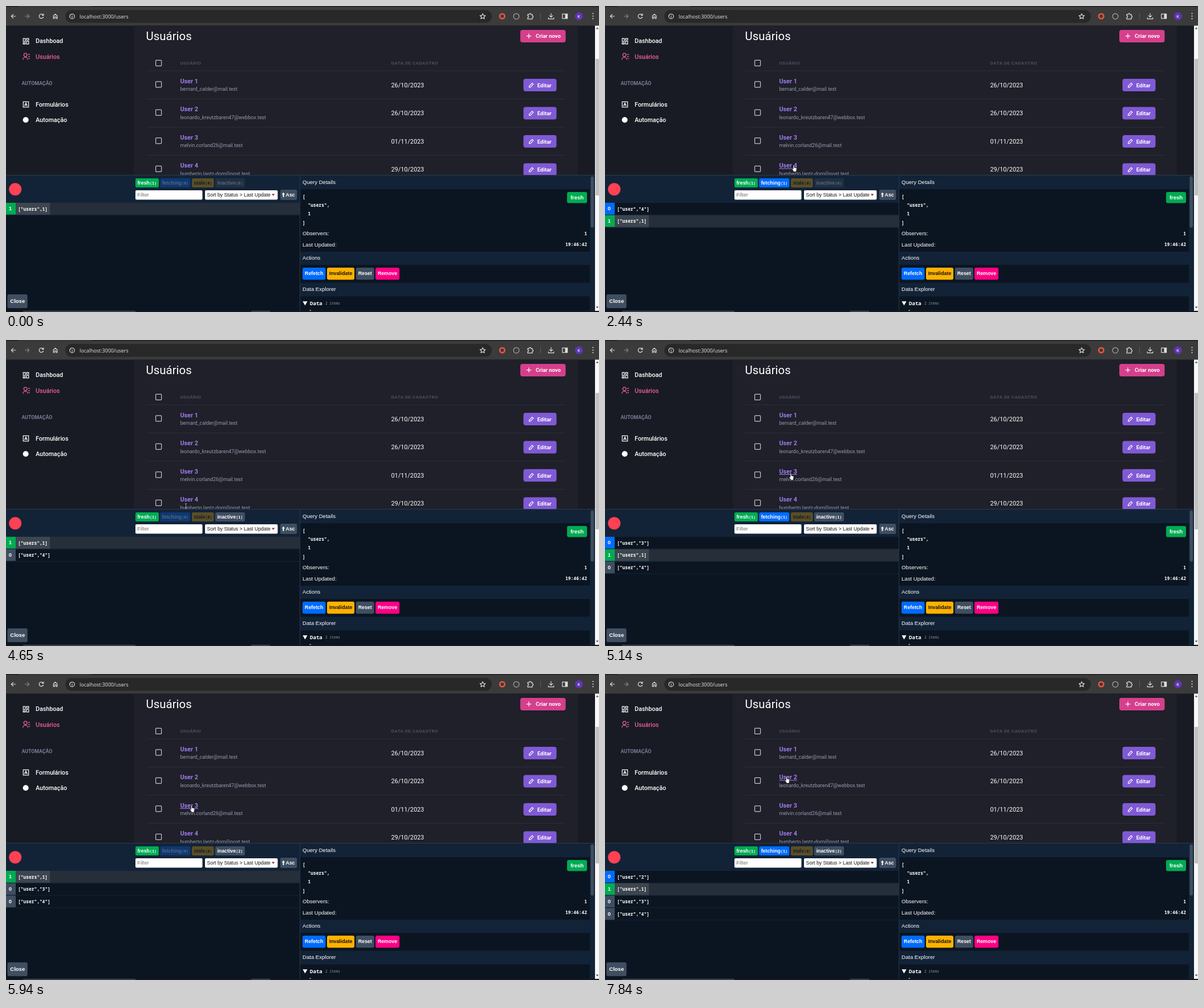
Animation, 1040 px wide and 538 px high, one loop 8000 ms. Source, as an HTML page:

```html
<!DOCTYPE html>
<html lang="pt">
<head>
<meta charset="utf-8">
<title>Usuários</title>
<style>
html, body { margin: 0; width: 100%; height: 100%; overflow: hidden; background: #181b23; }
svg { display: block; width: 1040px; height: 538px; }
text { fill: #fff; white-space: pre; }
.page text { font-family: Roboto, sans-serif; font-size: 10.85px; }
.page .menu { font-size: 10.7px; font-weight: 500; }
.page .title { font-size: 20.4px; }
.page .section { font-size: 8.7px; font-weight: 700; fill: #797d9a; }
.page .th { font-size: 8.1px; font-weight: 700; letter-spacing: .05em; fill: #4b4d63; }
.page .name { font-weight: 700; fill: #9f7aea; }
.page .mail { font-size: 8.84px; fill: #9699b0; }
.page .btn { font-size: 9.5px; font-weight: 700; }
.tools text { font-family: "Liberation Sans", Arial, sans-serif; font-size: 9.57px; }
.tools .b { font-weight: 700; font-size: 8.8px; }
.tools .big { font-weight: 700; font-size: 9.5px; }
.tools .m { font-family: "Noto Sans Mono", monospace; font-size: 7.9px; font-weight: 600; }
.tools .count { font-family: "Noto Sans Mono", monospace; font-size: 6.8px; font-weight: 600; }
.tools .dark { fill: #111; }
.line { fill: none; stroke: #fff; stroke-width: 1.2; }
.bar .line { stroke: #dedede; }
</style>
</head>
<body>
<svg viewBox="0 0 1040 538">
  <g class="bar">
    <rect width="1040" height="35" fill="#3b3b3b"/>
    <rect width="1040" height="1.5" fill="#202124"/>
    <rect x="22" width="128" height="1.5" fill="#3b3b3b"/>
    <rect x="104" y="7" width="748" height="22.5" rx="11.2" fill="#282828"/>
    <path class="line" d="M17 18H9.5M13 14.3L9.3 18L13 21.7"/>
    <path class="line" style="stroke:#858585" d="M33 18H40.5M37 14.3L40.7 18L37 21.7"/>
    <path class="line" d="M65 15.6A3.8 3.8 0 1 0 65.6 19M65.8 13.6V16.4H62.8"/>
    <path class="line" d="M83.2 17.2L86.5 14.2L89.8 17.2V22H87.8V19H85.2V22H83.2Z"/>
    <circle class="line" cx="116" cy="18.2" r="4.2"/>
    <path class="line" d="M116 17.7V20.6M116 15.7V16.8"/>
    <text x="129" y="21.6" font-family="Open Sans, sans-serif" font-size="8.9" style="fill:#e8e8e8">localhost:3000/users</text>
    <path class="line" stroke-linejoin="round" d="M836 13.4L837.4 16.6L840.8 16.9L838.2 19.2L839 22.5L836 20.8L833 22.5L833.8 19.2L831.2 16.9L834.6 16.6Z"/>
    <circle cx="870.3" cy="18" r="4.3" fill="none" stroke="#e9563d" stroke-width="2.6"/>
    <circle class="line" cx="895" cy="18.2" r="4.9" style="stroke:#a8a8a8"/>
    <path class="line" d="M915 14.8H917.6A1.6 1.6 0 0 1 920.8 14.8H923V17.2A1.6 1.6 0 0 1 923 20.4V22.8H915V20.4A1.6 1.6 0 0 0 915 17.2Z"/>
    <path d="M937.5 12.5V23.5" stroke="#5c5c5c"/>
    <path class="line" d="M956 12.8V19.5M952.8 16.6L956 19.7L959.2 16.6M951.3 20.3V22.7H960.7V20.3"/>
    <rect class="line" x="975.8" y="14" width="8.8" height="8"/>
    <rect x="980.5" y="14" width="4" height="8" fill="#dedede"/>
    <circle cx="1004.8" cy="18" r="7" fill="#5e35b1"/>
    <text x="1004.8" y="20.8" text-anchor="middle" font-family="Roboto, sans-serif" font-size="7.8">K</text>
    <path d="M1029.5 13.2h.01M1029.5 17.7h.01M1029.5 22.2h.01" stroke="#dedede" stroke-width="2.1" stroke-linecap="round"/>
  </g>

  <g class="page">
    <rect y="34.5" width="1040" height="504" fill="#181b23"/>
    <rect x="224" y="34.5" width="779" height="263" fill="#1f2029"/>
    <path class="line" d="M30.2 57.2h3.6v5.2h-3.6zM36 57.2h3.8v2.8H36zM30.2 64.6h3.6v2.2h-3.6zM36 62.2h3.8v4.6H36z"/>
    <text class="menu" x="52" y="65.4">Dashboad</text>
    <g style="stroke:#ed5f9b">
      <circle cx="34" cy="86" r="2.8" fill="none" stroke-width="1.2"/>
      <path d="M29.6 94.6A4.4 4.4 0 0 1 38.4 94.6M38.4 85.2H42M38.8 88.8H42M39.6 92.4H42" fill="none" stroke-width="1.2"/>
    </g>
    <text class="menu" x="52" y="92.8" style="fill:#ed5f9b">Usuários</text>
    <text class="section" x="27.6" y="138.7">AUTOMAÇÃO</text>
    <rect class="line" x="30.2" y="168.4" width="9.4" height="9.4"/>
    <path class="line" d="M32.5 175.8L34.9 170.4L37.3 175.8M33.3 174.1H36.5"/>
    <text class="menu" x="52" y="177.1">Formulários</text>
    <circle cx="34.6" cy="200.3" r="5" fill="#fff"/>
    <text class="menu" x="52" y="204.4">Automação</text>

    <text class="title" x="245.6" y="60.2">Usuários</text>
    <rect x="902" y="42" width="79.5" height="22" rx="4" fill="#d53f8c"/>
    <path class="line" d="M917 48.6V57M912.8 52.8H921.2"/>
    <text class="btn" x="929" y="56.2">Criar novo</text>
    <rect class="line" x="262.6" y="95.3" width="10" height="10" rx="1" style="stroke:#c3c4cf"/>
    <text class="th" x="305.4" y="103">USUÁRIO</text>
    <text class="th" x="675.5" y="103">DATA DE CADASTRO</text>
    <g id="users"></g>

    <rect x="1033" y="34.5" width="7" height="504" fill="#f8f8f8"/>
    <rect x="1034" y="93" width="6" height="240" fill="#c1c1c1"/>
    <path d="M1034.6 40.5L1037 37.5L1039.4 40.5ZM1034.6 528.5L1037 531.5L1039.4 528.5Z" fill="#505050"/>
  </g>

  <g class="tools">
    <rect y="297" width="1033" height="241" fill="#0b1521"/>
    <rect y="297" width="1033" height="1" fill="#2c3b4d"/>
    <rect y="298" width="515" height="48" fill="#132337"/>
    <circle cx="16.2" cy="322.3" r="11" fill="#ff4154"/>
    <g id="pills"></g>
    <rect x="227" y="324" width="117.5" height="16.5" rx="2" fill="#fff"/>
    <text x="230.3" y="335.2" style="fill:#757575;font-size:9.3px">Filter</text>
    <rect x="349" y="324" width="127.5" height="16.5" rx="2" fill="#fff"/>
    <text x="352.6" y="335.2" style="fill:#111;font-size:8.7px">Sort by Status &gt; Last Update</text>
    <path d="M466 330.6H471.4L468.7 333.8Z" fill="#7a2437"/>
    <rect x="481" y="323" width="29.3" height="18" rx="2.5" fill="#3f4e60"/>
    <path d="M486.5 327.8L489.2 331.2H487.5V336H485.5V331.2H483.8Z" fill="#fff"/>
    <text class="b" x="490.6" y="335.2">Asc</text>
    <g id="rows"></g>
    <rect x="2.5" y="507" width="35.2" height="24.3" rx="3" fill="#3f4e60"/>
    <text class="big" x="7.3" y="522.3">Close</text>

    <path d="M515.5 298V536" stroke="#24364b"/>
    <path d="M516 298H1024V322H516ZM516 432H1024V455H516ZM516 486.5H1024V510.5H516ZM1024 298H1033V536H1024Z" fill="#132337"/>
    <rect x="1025.4" y="299.5" width="5.6" height="90" rx="2.8" fill="#3f4e60"/>
    <text x="520" y="313.3">Query Details</text>
    <text class="m" x="520" y="337.7">[</text>
    <text class="m" x="529.5" y="352.7">"users",</text>
    <text class="m" x="529.5" y="368">1</text>
    <text class="m" x="520" y="383.5">]</text>
    <rect x="984" y="327" width="35" height="19.6" rx="3" fill="#00ab52"/>
    <text class="big" x="1001.5" y="340" text-anchor="middle">fresh</text>
    <text x="520" y="403.4">Observers:</text>
    <text class="m" x="1019" y="402.8" text-anchor="end">1</text>
    <text x="520" y="422.6">Last Updated:</text>
    <text class="m" x="1019" y="421.9" text-anchor="end">19:46:42</text>
    <text x="520" y="446">Actions</text>
    <g id="actions"></g>
    <text x="520" y="501.4">Data Explorer</text>
    <path d="M520.4 519.2H528.6L524.5 526.6Z" fill="#fff"/>
    <text class="m" x="533" y="525.6" style="font-size:9.1px">Data</text>
    <text class="m" x="560" y="525.4" style="font-size:6.2px;font-weight:400;fill:#8b949e">2 items</text>
    <rect x="532.6" y="534.6" width="2" height="1.4" fill="#ddd"/>
    <rect y="536" width="1040" height="2" fill="#17191d"/>
    <path d="M30 536.7H227M430 536.7H463" stroke="#56585c" stroke-width="1.2"/>
  </g>

  <g id="cursor" stroke="#111" stroke-width=".7" stroke-linejoin="round" fill="#fff">
    <path id="arrow" d="M0 0V8.7L2 6.9L3.4 10L4.9 9.4L3.5 6.4H6.2Z"/>
    <path id="hand" d="M-1 1Q0 -.6 1 1V4.4L4.2 5Q5.3 5.3 5.2 6.6L4.6 10V12H-.6V10.6L-3 7.6Q-3.2 6.2 -1.9 6.6L-1 7.4Z"/>
    <path id="beam" d="M-1.8 -4.2H1.8M0 -4.2V4.2M-1.8 4.2H1.8" stroke="#c4c4c8"/>
  </g>
</svg>
<script>
const $ = id => document.getElementById(id);
const LOOP = 8000, PITCH = 49.5, ROW = 21.8;

const users = [
  ['bernard_calder@mail.test', '26/10/2023'],
  ['leonardo_kreutzbaren47@webbox.test', '26/10/2023'],
  ['melvin.corland26@mail.test', '01/11/2023'],
  ['humberto.lantz-dorn@post.test', '29/10/2023']
];
$('users').innerHTML = users.map(([mail, date], i) => `
  <g transform="translate(0 ${i * PITCH})">
    <path d="M246 114H981.5" stroke="#2d2e3a"/>
    <rect class="line" x="262.6" y="132.8" width="10" height="10" rx="1" style="stroke:#c3c4cf"/>
    <text class="name" x="305.4" y="135.9">User ${i + 1}</text>
    <text class="mail" x="305.4" y="149">${mail}</text>
    <text x="675.5" y="142.9">${date}</text>
    <rect x="907.5" y="128" width="58" height="22" rx="4" fill="#805ad5"/>
    <path class="line" d="M917.6 142.8V140.8L922.8 135.6L924.8 137.6L919.6 142.8Z"/>
    <text class="btn" x="931.8" y="142.6">Editar</text>
  </g>`).join('');
const names = [...document.querySelectorAll('.name')];

const actions = [
  ['Refetch', 520, 40.5, '#006bff'], ['Invalidate', 563, 48, '#ffb200'],
  ['Reset', 613.7, 32, '#3f4e60'], ['Remove', 648, 42, '#ff0085']
];
$('actions').innerHTML = actions.map(([label, x, w, fill]) => `
  <rect x="${x}" y="460" width="${w}" height="21.3" rx="3" fill="${fill}"/>
  <text class="b ${label == 'Invalidate' ? 'dark' : ''}" x="${x + w / 2}" y="473.4" text-anchor="middle">${label}</text>`).join('');

const pills = [
  ['fresh', 227, 41, '#00ab52'], ['fetching', 270.3, 53, '#006bff'],
  ['stale', 326, 38.5, '#ffb200'], ['inactive', 367, 52, '#3f4e60']
];
function drawPills(counts) {
  $('pills').innerHTML = pills.map(([label, x, w, fill], i) => {
    const dark = label == 'stale' ? 'dark' : '';
    return `<g opacity="${counts[i] ? 1 : .3}">
      <rect x="${x}" y="303" width="${w}" height="16" rx="2.5" fill="${fill}"/>
      <text class="b ${dark}" x="${x + 3.4}" y="313.9">${label}<tspan class="count">(${counts[i]})</tspan></text></g>`;
  }).join('');
}

function drawRows(rows) {
  $('rows').innerHTML = rows.map(([key, n, fill], i) => `
    <g transform="translate(0 ${346 + i * ROW})">
      ${n ? `<rect width="515" height="${ROW}" fill="#252e39"/><rect x="17" width="60" height="${ROW}" fill="#3d464f"/>` : ''}
      <rect width="17" height="${ROW - 1}" fill="${fill}"/>
      <rect y="${ROW - 1}" width="515" height="1" fill="#132337"/>
      <text class="big" x="4.7" y="13.4">${n}</text>
      <text class="m" x="21" y="13.6">${key}</text>
    </g>`).join('');
}

// prefetches: user, start, end
const fetches = [[4, 2440, 3160], [3, 5060, 5940], [2, 7780, Infinity]];
let shown, rowCount = 1;
function drawQueries(t) {
  const key = fetches.map(([, a, b]) => (t >= a) + (t >= b)).join('');
  if (key == shown) return;
  shown = key;
  const row = (id, fill) => [`["user","${id}"]`, 0, fill];
  const busy = fetches.filter(([, a, b]) => t >= a && t < b);
  const done = fetches.filter(f => t >= f[2]).reverse();
  const rows = [
    ...busy.map(f => row(f[0], '#006bff')),
    ['["users",1]', 1, '#00ab52'],
    ...done.map(f => row(f[0], '#3f4e60'))
  ];
  rowCount = rows.length;
  drawPills([1, busy.length, 0, done.length]);
  drawRows(rows);
}

// pointer moves: start, end, steps, then points of [progress, x, y]
const moves = [
  [250, 450, 4, [0, 960, 560], [.25, 878, 527], [.6, 600, 474], [1, 392, 452]],
  [780, 1260, 7, [0, 392, 452], [.5, 340, 459], [1, 297, 467]],
  [1590, 2370, 12, [0, 297, 467], [.42, 340, 381], [.7, 341, 318], [1, 331, 280.5]],
  [2440, 2500, 2, [0, 331, 280.5], [1, 331, 278.5]],
  [3360, 3840, 8, [0, 331, 278.5], [.5, 286, 410], [1, 254, 513]],
  [4300, 5060, 12, [0, 254, 513], [.25, 283, 400], [.5, 315.5, 292], [.75, 323, 255], [1, 326, 235]],
  [5140, 5470, 5, [0, 326, 235], [1, 325.5, 231]],
  [6140, 6490, 6, [0, 325.5, 231], [.5, 245, 333], [1, 172, 413]],
  [6950, 7710, 12, [0, 172, 413], [.083, 172, 413], [.25, 164.5, 406], [.6, 238, 300], [1, 318.5, 181.5]],
  [7780, 7840, 2, [0, 318.5, 181.5], [1, 318.5, 180]]
];
function pointer(t) {
  const move = moves.filter(m => t >= m[0]).pop();
  if (!move) return null;
  const [start, end, n, ...pts] = move;
  const step = Math.floor((t - start) / ((end - start) / (n - 1)) + .01);
  const p = Math.min(1, (step + 1) / n);
  const i = Math.max(1, pts.findIndex(q => q[0] >= p));
  const [a, b] = [pts[i - 1], pts[i]];
  const k = (p - a[0]) / (b[0] - a[0]);
  return [a[1] + (b[1] - a[1]) * k, a[2] + (b[2] - a[2]) * k];
}

function drawPointer(t) {
  const pos = pointer(t);
  $('cursor').style.display = pos ? '' : 'none';
  let hover = -1, kind = 'arrow';
  if (pos) {
    const [x, y] = pos;
    const i = Math.floor((y - 125) / PITCH), dy = y - 125 - i * PITCH;
    if (y < 297) {
      if (x > 305 && x < 337 && dy < 13.5) { hover = i; kind = 'hand'; }
      else if (x > 305 && x < 410 && dy > 15 && dy < 27) kind = 'beam';
    } else if (y > 346 && y < 346 + rowCount * ROW && x < 515) kind = 'hand';
    else if (x > 227 && x < 344 && y > 324 && y < 341) kind = 'beam';
    $('cursor').setAttribute('transform', `translate(${x} ${y})`);
  }
  for (const id of ['arrow', 'hand', 'beam']) $(id).style.display = id == kind ? '' : 'none';
  names.forEach((el, i) => { el.style.textDecoration = i == hover ? 'underline' : 'none'; });
}

function frame() {
  const t = performance.now() % LOOP;
  drawQueries(t);
  drawPointer(t);
  requestAnimationFrame(frame);
}
frame();
</script>
</body>
</html>
```
